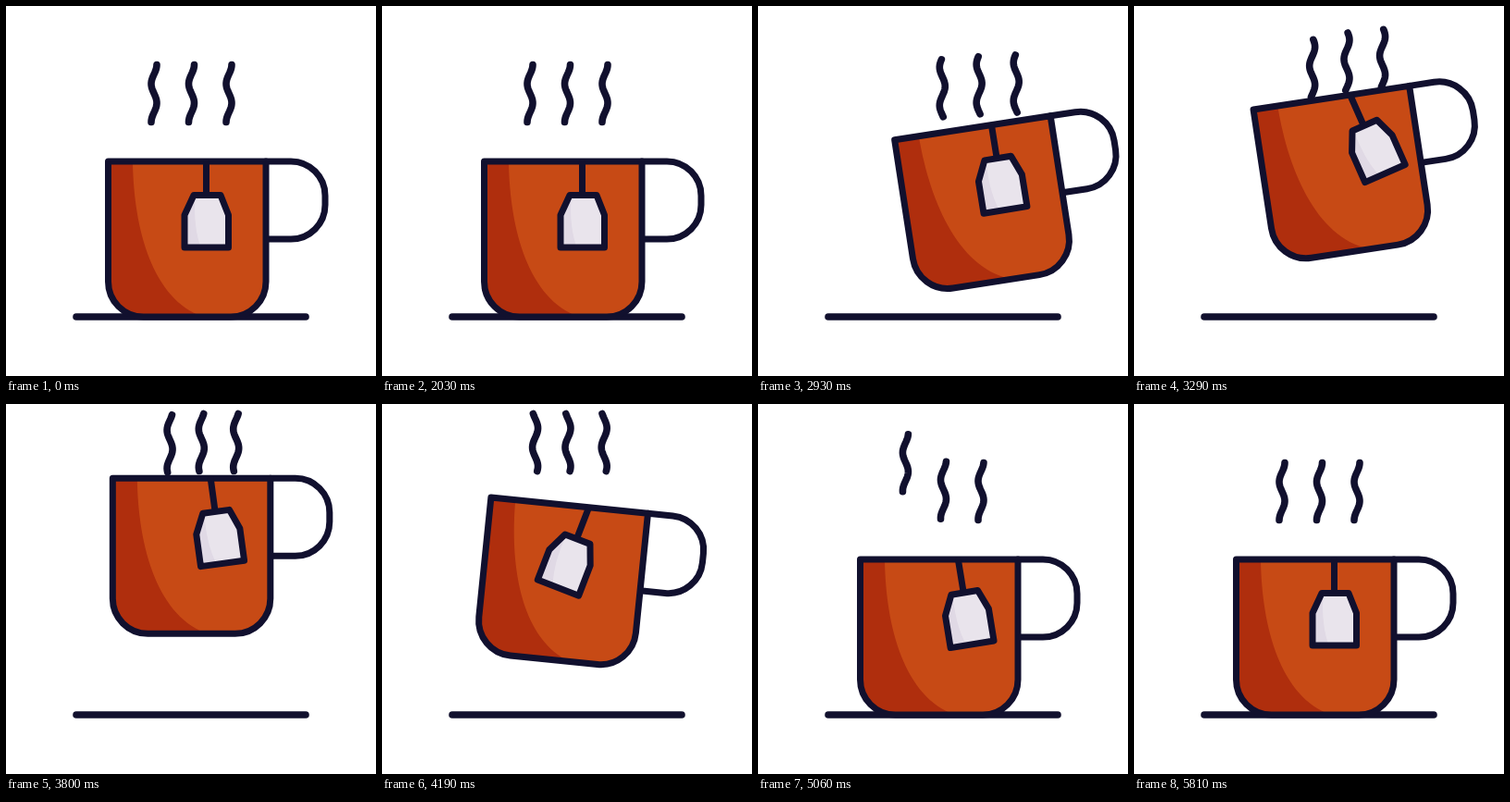
Animation, 400 px wide and 400 px high, one loop 5.84 s. Source, as an HTML page:

```html
<!DOCTYPE html>
<html lang="en">
<head>
<meta charset="utf-8">
<title>Tea cup</title>
<style>
  html, body { margin: 0; width: 100%; height: 100%; overflow: hidden; background: #fff; }
  svg { display: block; width: 100vw; height: 100vh; }
  .line { fill: none; stroke: #11102e; stroke-width: 7; stroke-linecap: round; stroke-linejoin: round; }
  .thick { stroke-width: 7.6; }
</style>
</head>
<body>
<svg viewBox="0 0 400 400">
  <defs>
    <path id="body" d="M110.500 168H281V298a38 38 0 0 1-38 38H148.500a38 38 0 0 1-38-38Z"/>
    <path id="label" d="M203 204.500H232L240.500 226V261H193V226Z"/>
    <clipPath id="inBody"><use href="#body"/></clipPath>
    <clipPath id="inLabel"><use href="#label"/></clipPath>
  </defs>
  <path class="line thick" d="M76 336H324"/>
  <g id="steam">
    <path class="line thick"/>
    <path class="line thick"/>
    <path class="line thick"/>
  </g>
  <g id="cup">
    <path class="line" d="M281 168H308a37 37 0 0 1 37 37v10a37 37 0 0 1-37 37H281"/>
    <use href="#body" fill="#c74a15"/>
    <path clip-path="url(#inBody)" fill="#af2e0d" d="M100 168H137C138 244 160 320 216 337H100Z"/>
    <use href="#body" class="line"/>
    <g id="tag">
      <path class="line" d="M216.500 169V204"/>
      <use href="#label" fill="#e9e4ec"/>
      <path clip-path="url(#inLabel)" fill="#e0d9e5" d="M190 200H205C203 222 204 244 211 262H190Z"/>
      <use href="#label" class="line"/>
    </g>
  </g>
</svg>
<script>
const LOOP = 5840, START = 2030, SETTLED = 2570;
const { PI, sin, cos, min, max } = Math;

const progress = (t, length) => min(1, max(0, (t - START) / length));
const hump = u => sin(PI * u) ** 2;

// Eases from one turning point [time, value] to the next.
function swing(...points) {
  return t => {
    let [from, value] = points[0];
    for (const [to, next] of points.slice(1)) {
      const u = min(1, max(0, (t - from) / (to - from)));
      value += (next - value) * u * u * (3 - 2 * u);
      from = to;
    }
    return value;
  };
}

const tagAngle = swing([START, 0], [2380, 11], [3400, -25], [4500, 32], [5000, -11], [5300, 5], [5700, 0]);
const steamX = swing([START, 0], [2740, 40], [4250, -1], [4950, 0]);
const steamY = swing([START, 0], [SETTLED, 4.5], [3650, -53], [4250, -53], [4950, 0]);
const steamRates = [0.8, 0.93, 1];

// The cup hops right, up and back, leaning into each half of the arc.
function cupPose(t) {
  const p = progress(t, 2850);
  const rise = p ** 1.3, lean = p ** 1.45;
  return {
    x: 52.5 * hump(1 - (1 - p) ** 2.1) - 3.5 * sin(PI * rise),
    y: -89 * hump(rise),
    turn: (5 * lean - 12) * sin(2 * PI * lean) ** 3
  };
}

function wisp(cx, top, phase) {
  const points = [];
  for (let y = 0; y <= 62; y += 2) {
    const x = cx + 3 * cos(y / 41.3 * 2 * PI - phase);
    points.push(`${x.toFixed(2)} ${(top + y).toFixed(2)}`);
  }
  return 'M' + points.join('L');
}

const cup = document.getElementById('cup');
const tag = document.getElementById('tag');
const wisps = document.querySelectorAll('#steam path');

function draw(t) {
  const { x, y, turn } = cupPose(t);
  cup.setAttribute('transform', `translate(${x} ${y}) rotate(${turn} 196 252)`);
  tag.setAttribute('transform', `rotate(${tagAngle(t) - turn} 216.5 169)`);

  const phase = 6 * PI * sin(PI / 2 * progress(t, 3230) ** 0.89) ** 2;
  wisps.forEach((path, i) => {
    // After the first push each wisp trails at its own pace.
    const local = min(t, SETTLED + (t - SETTLED) * steamRates[i]);
    path.setAttribute('d', wisp(160 + 40.5 * i + steamX(local), 63.5 + steamY(local), phase));
  });
}

const start = performance.now();
function tick() {
  draw((performance.now() - start) % LOOP);
  requestAnimationFrame(tick);
}
tick();
</script>
</body>
</html>
```
